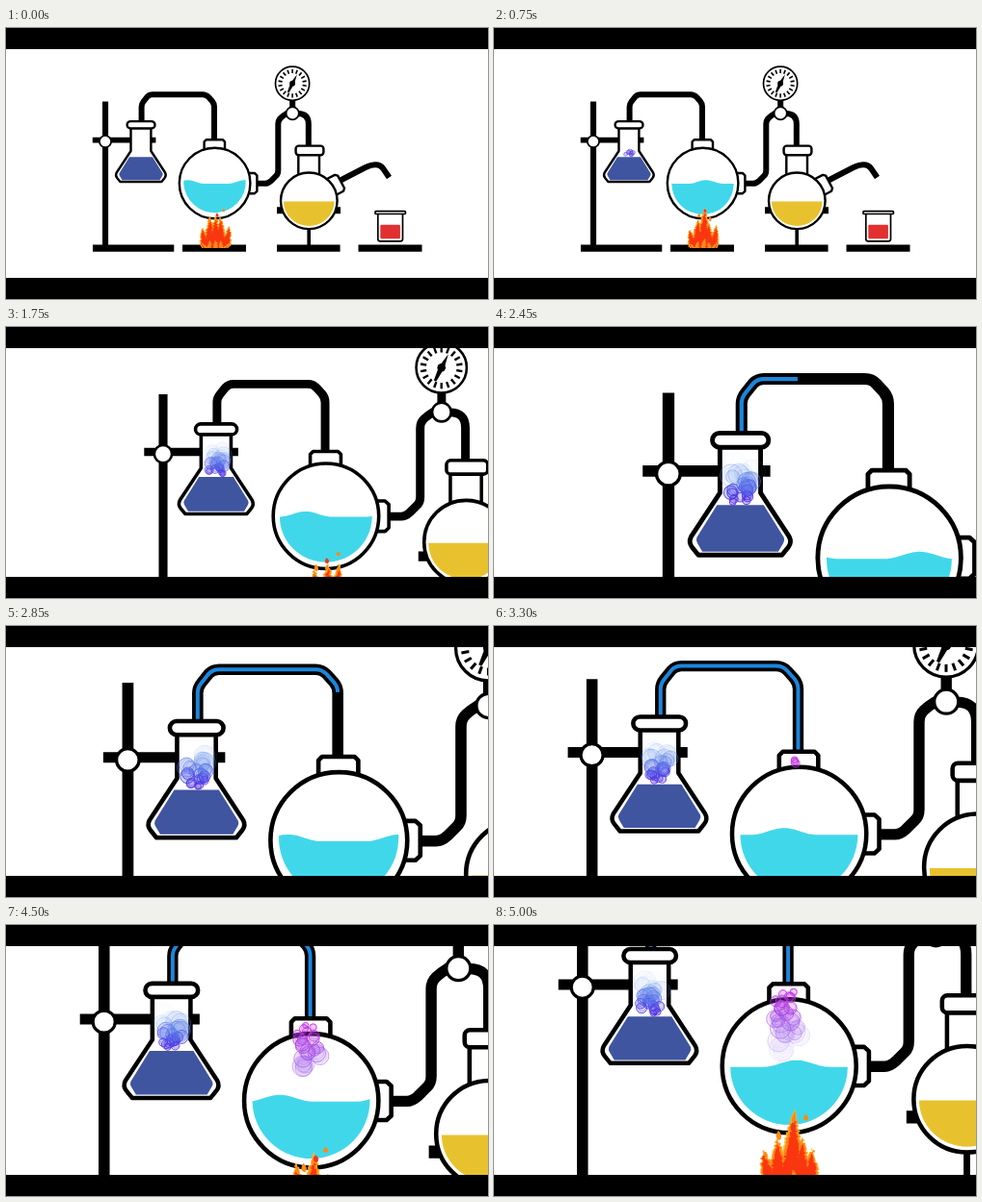
An HTML page for the animation above (5.05 s loop, 500 px wide and 282 px high).

```html
<!DOCTYPE html>
<html lang="en">
<head>
<meta charset="utf-8">
<title>Chemistry lab</title>
<style>
html, body { margin: 0; width: 100%; height: 100%; overflow: hidden; background: #000; }
svg { display: block; width: 100%; height: 100%; }
.glass { fill: #fff; stroke: #000; stroke-width: 2.4; stroke-linejoin: round; }
.thin { stroke-width: 1.7; }
.pipe { fill: none; stroke: #000; stroke-width: 6; }
</style>
</head>
<body>
<svg viewBox="0 0 500 282">
  <rect width="500" height="282" fill="#fff"/>
  <g id="world">
    <path d="M90 225.6h84.3v7.2H90zM183 225.6h66v7.2h-66zM281 225.6h65.6v7.2H281zM365.5 225.6h66v7.2h-66z"/>
    <path d="M100 76.4h6.1V228H100zM89.8 113.8h65.6v5.8H89.8zM281 186.2h66v7h-66zM312.4 205h3.6v22h-3.6z"/>
    <circle class="glass thin" cx="103" cy="118.1" r="6.1"/>

    <path id="tube" class="pipe" d="M140.6 98V82Q140.6 79 142.6 76.5L146.6 71.5Q148.8 69.2 152 69.2H204Q207.6 69.2 210 71.8L213.8 76Q216 78.6 216 82V117"/>
    <path id="dye" fill="none" stroke="#1c86dc" stroke-width="2.1"/>
    <path class="pipe" d="M260 161.8H269Q272 161.8 275 159L280 154Q282.3 152 282.3 148V100Q282.3 96 285 93.5T291 89H303Q313.8 89 313.8 100V124"/>
    <path class="pipe" d="M347 158.5L373 145Q386 139 391 146L397.5 155.5"/>

    <path class="glass" d="M129.5 103V128L114.7 150.5Q113.2 153.5 115.2 156L118.4 160H161.4L164.6 156Q166.6 153.5 165.1 150.5L150.4 128V103Z"/>
    <rect class="glass" x="125.6" y="97.1" width="28.9" height="7.4" rx="3.7"/>
    <path fill="#4055a0" d="M128 134.2H152L162.4 151Q163 152.5 162 154L159.5 158.2H120.5L118 154Q117 152.5 117.6 151Z"/>

    <path class="glass" d="M205.6 128V118.3L207.6 116.3H225L227 118.3V128Z"/>
    <path class="glass" d="M248 151H257.8L260.4 153.4V169.8L257.8 172.2H248Z"/>
    <circle class="glass" cx="216.6" cy="161.5" r="36.8"/>
    <path id="water" fill="#41d7ea"/>

    <path d="M294.2 74h6v10h-6z"/>
    <circle class="glass thin" cx="297.2" cy="88.8" r="6.6"/>
    <circle class="glass thin" cx="297.1" cy="57.7" r="17.6"/>
    <g id="ticks" transform="translate(297.1 57.7)" stroke="#000" stroke-width="1.6"/>
    <path d="M301.9 48.2L299 58.2L293.4 67.4L291.8 66.6L295.4 56.9Z"/>
    <circle cx="297.1" cy="57.7" r="2.9"/>

    <path class="glass" d="M303.3 131H325V154H303.3Z"/>
    <rect class="glass" x="300.6" y="122.6" width="28.8" height="9.6" rx="3"/>
    <path class="glass" transform="translate(342.3 163) rotate(-28)" d="M-7-9.6H3.6L6-7.4V7.4L3.6 9.6H-7Z"/>
    <circle class="glass" cx="314.3" cy="179.8" r="29.3"/>
    <path fill="#e8c22e" d="M288 180.4H340.6A26.3 25.6 0 0 1 288 180.4Z"/>

    <path class="glass thin" d="M385.8 193V219.5Q385.8 221.8 388 221.8H409.3Q411.5 221.8 411.5 219.5V193Z"/>
    <rect class="glass thin" x="383" y="190.6" width="31.4" height="2.9" rx=".8"/>
    <rect x="388.3" y="204.8" width="20.6" height="14.4" rx="1" fill="#e23030"/>

    <g id="rising"/>
    <g id="falling"/>
    <g id="fire"/>
  </g>
  <path d="M0 0H500V22H0zM0 260H500V282H0z"/>
</svg>
<script>
const LOOP = 5050;
const $ = id => document.getElementById(id);
const clamp = x => Math.min(1, Math.max(0, x));
const rand = n => { const x = Math.sin(n * 127.1 + 11.7) * 43758.5453; return x - Math.floor(x); };

function set(el, attrs) {
  for (const k in attrs) el.setAttribute(k, attrs[k]);
}
function add(parent, tag, attrs = {}) {
  const el = document.createElementNS(parent.namespaceURI, tag);
  set(el, attrs);
  return parent.appendChild(el);
}

// Camera keys: time, zoom, x, y
const cam = [
  [0, 1, 0, 0], [980, 1, 0, 0], [1100, 1.033, .8, -2.8], [1300, 1.14, 3.1, -12.5],
  [1750, 1.487, 9.7, -43.5], [2450, 2.018, -26.9, -85.6], [2750, 1.95, -59.5, -87.5],
  [3080, 1.893, -93.4, -89.4], [3300, 1.893, -93.4, -89.4], [4000, 1.893, -93.2, -119.4],
  [4450, 1.893, -93.2, -122], [4800, 1.891, -96.2, -138], [5050, 1.888, -103.4, -160]
];

// Monotone cubic interpolation through the keys
function slope(i, c) {
  if (i === 0 || i === cam.length - 1) return 0;
  const d = j => (cam[j + 1][c] - cam[j][c]) / (cam[j + 1][0] - cam[j][0]);
  const a = d(i - 1), b = d(i);
  return a * b > 0 ? 2 * a * b / (a + b) : 0;
}
function camAt(t, c) {
  let i = 0;
  while (i < cam.length - 2 && t > cam[i + 1][0]) i++;
  const [p, q] = [cam[i], cam[i + 1]];
  const h = q[0] - p[0], u = (t - p[0]) / h, v = 1 - u;
  return v * v * (1 + 2 * u) * p[c] + u * u * (3 - 2 * u) * q[c]
    + h * u * v * (v * slope(i, c) - u * slope(i + 1, c));
}

for (let a = 0; a < 360; a += 20) {
  add($('ticks'), 'path', { d: 'M0-14.8V-10.6', transform: `rotate(${a})` });
}

const tubeLen = $('tube').getTotalLength();
set($('dye'), { d: $('tube').getAttribute('d') });

function drawDye(t) {
  const len = tubeLen * clamp((t - 2060) / 1060);
  set($('dye'), { 'stroke-dasharray': `${len} 999`, visibility: len ? 'visible' : 'hidden' });
}

// Half disc of liquid with a hump travelling to the right
function drawWater(t) {
  const cx = 216.5, r = 32.2, span = 60, crest = 188 + t * .0425;
  let d = '';
  for (let x = cx - r; x <= cx + r + .01; x += r / 32) {
    const off = ((x - crest) % span + span * 1.5) % span - span / 2;
    const lift = Math.abs(off) < 18 ? 3.7 * Math.cos(off / 18 * Math.PI / 2) ** 2 : 0;
    d += `${d ? 'L' : 'M'}${x.toFixed(2)} ${(162 - lift).toFixed(2)}`;
  }
  set($('water'), { d: d + `A${r} 32 0 0 1 ${cx - r} 162Z` });
}

const streams = [
  { g: $('rising'), start: 480, gap: 48, life: 1250, x: 140.2, y: 132.5, dy: -19,
    spread: 6.5, r0: 1.6, r1: 6.2, hue: [256, 210] },
  { g: $('falling'), start: 3130, gap: 65, life: 1900, x: 215, y: 120, dy: 35,
    spread: 7, r0: 1.5, r1: 7.2, hue: [292, 256] }
];
for (const s of streams) {
  s.dots = Array.from({ length: Math.ceil(s.life / s.gap) }, () => {
    const g = add(s.g, 'g');
    add(g, 'circle', { 'fill-opacity': .24, 'stroke-width': .5 });
    add(g, 'circle', { fill: 'none', 'stroke-width': .3, 'stroke-opacity': .6 });
    return g;
  });
}

function drawBubbles(s, t) {
  const n = s.dots.length, last = Math.floor((t - s.start) / s.gap);
  s.dots.forEach((g, i) => {
    const k = last - i, age = (t - s.start - k * s.gap) / s.life;
    if (k < 0 || age > 1) return set(g, { visibility: 'hidden' });
    const seed = k + s.start, side = rand(seed) * 2 - 1;
    const r = s.r0 + (s.r1 - s.r0) * age ** .7 * (.5 + .6 * rand(seed + .3));
    const x = s.x + side * s.spread * (.75 + .25 * age) + Math.sin(age * 5 + k) * .8;
    const y = s.y + s.dy * age * (.8 + .25 * rand(seed + .6));
    const hue = s.hue[0] + (s.hue[1] - s.hue[0]) * age;
    const color = `hsl(${hue.toFixed(0)} 75% ${(52 + 18 * age).toFixed(0)}%)`;
    set(g, {
      visibility: 'visible', fill: color, stroke: color,
      opacity: (.9 * Math.min(1, (1 - age) * 1.6)).toFixed(3)
    });
    set(g.children[0], { cx: x, cy: y, r });
    set(g.children[1], { cx: x + .3, cy: y - .3, r: r * .72 });
  });
}

// Flame tongues: base x, tip x, tip y, half width
const tongues = [
  [207, 204, 206, 5.5], [211, 210, 196, 6.5], [217, 218, 187, 7.5],
  [223, 224, 196, 6.5], [227, 231, 205, 5.5]
];
const layers = [['#ffb42c', 1, 1], ['#ff8416', .96, .84], ['#fa3610', .86, .64], ['#ff8a1c', .22, .34]]
  .map(([fill, tall, wide]) => ({ tall, wide, el: add($('fire'), 'path', { fill }) }));
const sparks = [0, 1, 2].map(i => add($('fire'), 'path', { fill: i === 1 ? '#f0381c' : '#ff8a14' }));

// Each tongue is a stack of ragged one-unit rows
function drawFire(t) {
  const tick = Math.floor(t / 50), foot = 229;
  for (const { tall, wide, el } of layers) {
    let d = '';
    tongues.forEach(([bx, tx, ty, w], i) => {
      const h = (foot - ty) * tall * (.9 + .12 * Math.sin(tick * 1.1 + i * 2.3));
      const sway = 1.6 * Math.sin(tick * .8 + i * 1.7);
      for (let y = 0; y < h; y++) {
        const u = y / h, ragged = rand(tick + y * 3.1 + i * 17) - .5;
        const hw = w * wide * (1 - u ** 1.6) * Math.min(1, .72 + y * .07) + .3;
        const x = bx + (tx + sway - bx) * u + ragged * 1.2;
        d += `M${(x - hw).toFixed(1)} ${foot - y}h${(2 * hw).toFixed(1)}v-1.05h${(-2 * hw).toFixed(1)}z`;
      }
    });
    set(el, { d });
  }
  sparks.forEach((el, i) => {
    const u = (tick * .09 + i * .37) % 1;
    const x = 211 + i * 6.5 + Math.sin(tick * .5 + i) * 1.5, y = 197 - u * 12, h = 5.5 * (1 - u * .5);
    set(el, { d: `M${x} ${y}q3 ${h * .5} .8 ${h}q-3.6 ${-h * .2}-.8 ${-h}z` });
  });
}

function draw(t) {
  const [s, x, y] = [1, 2, 3].map(c => camAt(t, c));
  set($('world'), { transform: `matrix(${s} 0 0 ${s} ${x} ${y})` });
  drawDye(t);
  drawWater(t);
  streams.forEach(b => drawBubbles(b, t));
  drawFire(t);
}

const t0 = performance.now();
function frame() {
  draw((performance.now() - t0) % LOOP);
  requestAnimationFrame(frame);
}
frame();
</script>
</body>
</html>
```
